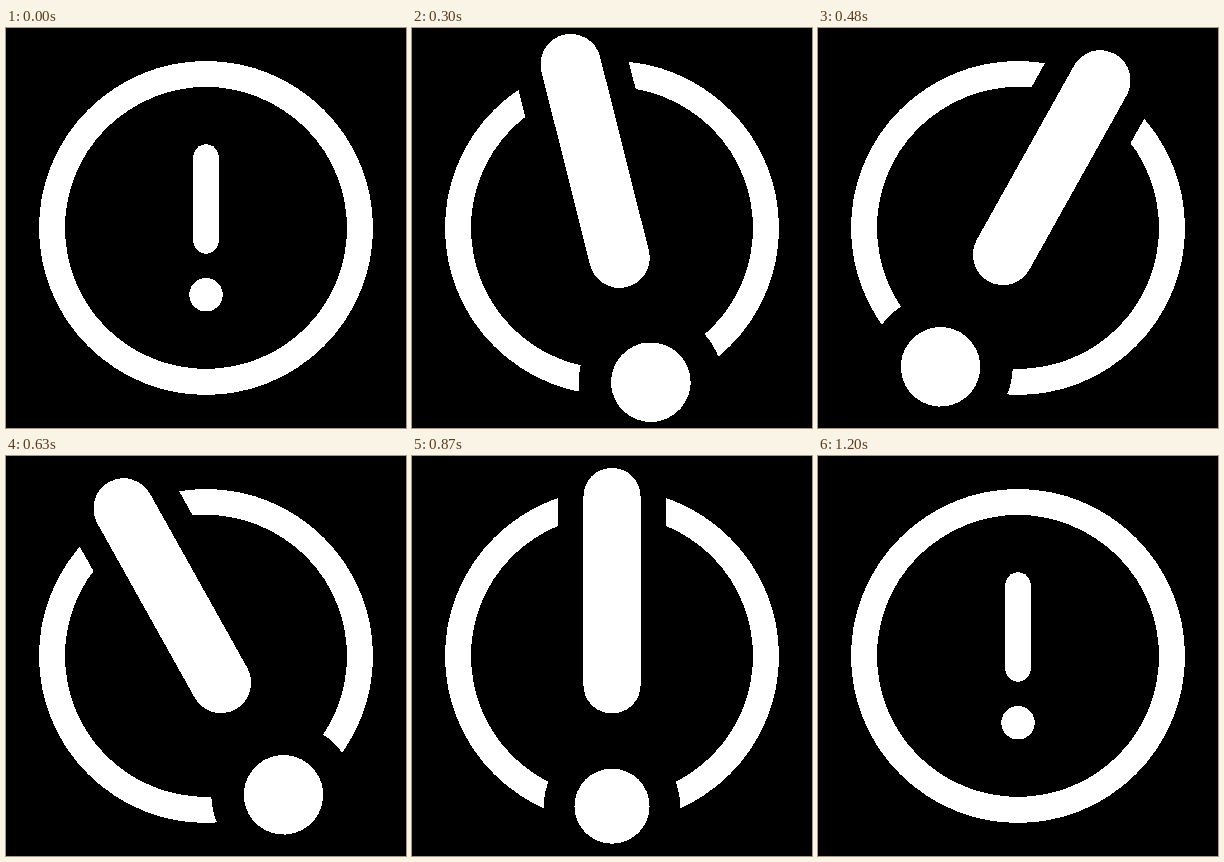
Write an HTML page with a canvas that moves like this. It is 400x400 px and loops after 1.23 s.

```html
<!DOCTYPE html>
<html lang="en">
<head>
<meta charset="utf-8">
<title>Alert icon</title>
<style>
  html, body { margin: 0; width: 100%; height: 100%; overflow: hidden; background: #000; }
  canvas { display: block; width: 400px; height: 400px; }
</style>
</head>
<body>
<canvas id="stage" width="400" height="400"></canvas>
<script>
const SIZE = 400;
const LOOP = 1230;
const STEP = 30;
const FULL = 2.38;
const ctx = document.getElementById('stage').getContext('2d', { willReadFrequently: true });

// Cubic Bezier timing curve, solved by bisection.
function bezier(x1, y1, x2, y2) {
  const at = (a, b, u) => 3 * a * u * (1 - u) ** 2 + 3 * b * u * u * (1 - u) + u ** 3;
  return p => {
    let lo = 0, hi = 1;
    for (let i = 0; i < 24; i++) {
      const mid = (lo + hi) / 2;
      if (at(x1, x2, mid) < p) lo = mid; else hi = mid;
    }
    return at(y1, y2, (lo + hi) / 2);
  };
}

const soft = bezier(0.4, 0, 0.2, 1);
const sine = p => (1 - Math.cos(Math.PI * p)) / 2;

// Keys are [time in ms, value].
const scaleKeys = [[0, 1], [270, FULL], [800, FULL], [1200, 1]];
const angleKeys = [[251, 0], [351, -29.2], [482, 29.2], [632, -29.2], [800, 0]];

function valueAt(keys, t, ease) {
  if (t <= keys[0][0]) return keys[0][1];
  for (let i = 1; i < keys.length; i++) {
    const [t0, v0] = keys[i - 1], [t1, v1] = keys[i];
    if (t < t1) return v0 + (v1 - v0) * ease((t - t0) / (t1 - t0));
  }
  return keys[keys.length - 1][1];
}

function drawMark(color, barWidth, dotRadius) {
  ctx.strokeStyle = ctx.fillStyle = color;
  ctx.lineWidth = barWidth;
  ctx.beginPath();
  ctx.moveTo(0, -71);
  ctx.lineTo(0, 12.9);
  ctx.stroke();
  ctx.beginPath();
  ctx.arc(0, 66.8, dotRadius, 0, 2 * Math.PI);
  ctx.fill();
}

// Turns soft edges into hard black and white ones.
function hardenEdges() {
  const image = ctx.getImageData(0, 0, SIZE, SIZE);
  const pixels = new Uint32Array(image.data.buffer);
  for (let i = 0; i < pixels.length; i++) {
    pixels[i] = (pixels[i] & 255) > 127 ? 0xffffffff : 0xff000000;
  }
  ctx.putImageData(image, 0, 0);
}

function draw(t) {
  ctx.setTransform(1, 0, 0, 1, 0, 0);
  ctx.fillStyle = '#000';
  ctx.fillRect(0, 0, SIZE, SIZE);
  ctx.translate(SIZE / 2, SIZE / 2);

  ctx.strokeStyle = '#fff';
  ctx.lineWidth = 26;
  ctx.beginPath();
  ctx.arc(0, 0, 154, 0, 2 * Math.PI);
  ctx.stroke();

  const scale = valueAt(scaleKeys, t, soft);
  ctx.rotate(valueAt(angleKeys, t, sine) * Math.PI / 180);
  ctx.scale(scale, scale);
  ctx.lineCap = 'round';
  drawMark('#000', 47.8, 30.3);
  drawMark('#fff', 25.4, 16.7);
  hardenEdges();
}

const start = performance.now();
function tick() {
  const t = (performance.now() - start) % LOOP;
  draw(Math.floor(t / STEP) * STEP);
  requestAnimationFrame(tick);
}
tick();
</script>
</body>
</html>
```
